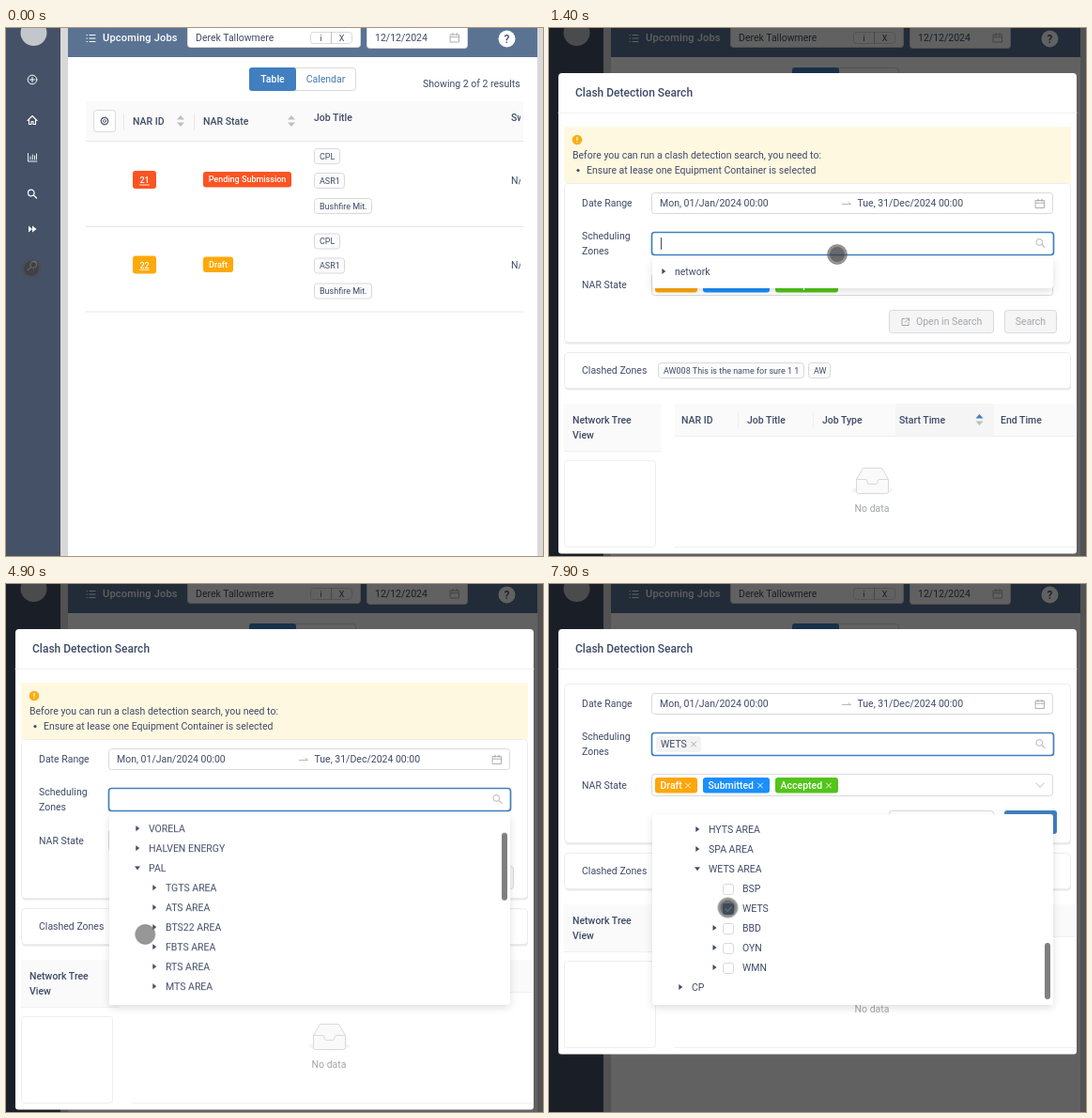
An HTML page that plays this animation: 572x562 px, repeating every 8 s.

```html
<!DOCTYPE html>
<html lang="en">
<head>
<meta charset="utf-8">
<title>Clash detection</title>
<style>
html, body { margin: 0; width: 572px; height: 562px; overflow: hidden; background: #fff; }
svg, .panel, .mask { position: absolute; left: 0; top: 0; }
text { font: 10.5px Roboto, "Liberation Sans", sans-serif; fill: #3f4b66; transform: translateY(3.8px); }
.m { font-weight: 500; }
.s { font-size: 9px; transform: translateY(3.2px); }
.title { font-size: 12px; font-weight: 500; transform: translateY(4.2px); }
.bar { font-size: 11px; font-weight: 500; letter-spacing: .2px; }
.w { fill: #fff; }
.c { text-anchor: middle; }
.dim { fill: #a3a5a9; }
.blue { fill: #4379b3; }
.line { fill: none; stroke-linecap: round; stroke-linejoin: round; }

.mask { width: 572px; height: 562px; background: rgba(0,0,0,.62); }
.panel { left: 110px; top: 245px; width: 427px; background: #fff; border-radius: 3px; overflow: hidden;
  box-shadow: 0 3px 9px rgba(0,0,0,.13); transform-origin: 50% 0; }
.view { position: absolute; top: 4px; left: 0; width: 427px; height: calc(100% - 8px); overflow: hidden; }
.thumb { position: absolute; left: 418px; top: 4px; width: 6px; border-radius: 3px; background: #7f7f7f; }

/* one loop is 8 s, so 1% is 80 ms */
.mask { animation: mask 8s linear infinite; }
.modal { transform-origin: 27px 256px; animation: zoom 8s cubic-bezier(.08,.82,.17,1) infinite; }
.body { animation: body 8s step-end infinite; }
.panel { animation: unfold 8s ease-out infinite; }
.scroll { animation: scroll 8s ease-in-out infinite; }
.thumb { animation: thumb 8s ease-in-out infinite, thumbOn 8s step-end infinite; }
.last { animation: last 8s step-end infinite; }
.cursor { animation: move 8s ease-in-out infinite; }
.press { animation: press 8s step-end infinite; }
.blink { animation: blink 1s -.9s step-end infinite; }
.ready { animation: ready 8s step-end infinite; }
.loading { animation: loading 8s step-end infinite; }
.focus { animation: focus 8s step-end infinite; }
.idle { animation: idle 8s step-end infinite; }
.kids1 { animation: kids1 8s step-end infinite; }
.kids2 { animation: kids2 8s step-end infinite; }
.kids3 { animation: kids3 8s step-end infinite; }
.picked { animation: picked 8s step-end infinite; }
.unpicked { animation: unpicked 8s step-end infinite; }
.turn1 { animation: turn1 8s infinite; }
.turn2 { animation: turn2 8s infinite; }
.turn3 { animation: turn3 8s infinite; }

@keyframes mask { 0%, 2.5% { opacity: 0; } 5.5%, 100% { opacity: 1; } }
@keyframes zoom {
  0%, 2.5% { opacity: 0; transform: scale(.2); }
  6.25%, 100% { opacity: 1; transform: none; }
}
@keyframes body {
  0% { transform: translateY(16px); }
  11.25% { transform: none; }
  96.875% { transform: translateY(-59px); }
}
@keyframes unfold {
  0%, 13.75% { opacity: 0; height: 32px; transform: scaleY(.8); }
  16%, 28.75% { opacity: 1; height: 32px; transform: none; }
  31%, 51.25% { opacity: 1; height: 139px; transform: none; }
  52.4%, 100% { opacity: 1; height: 203px; transform: none; }
}
@keyframes scroll {
  0%, 58.75% { transform: none; }
  68.75%, 81.25% { transform: translateY(-313px); }
  86.25%, 100% { transform: translateY(-418px); }
}
@keyframes thumb {
  0%, 58.75% { transform: none; height: 72px; }
  68.75%, 75% { transform: translateY(121px); height: 72px; }
  75.01%, 81.25% { transform: translateY(100px); height: 60px; }
  86.25%, 100% { transform: translateY(133px); height: 60px; }
}
@keyframes thumbOn { 0% { opacity: 0; } 58.75% { opacity: 1; } }
@keyframes last {
  0% { transform: none; }
  51.25% { transform: translateY(378px); }
  75% { transform: translateY(483px); }
}
@keyframes move {
  0%, 2.5% { transform: translate(27px, 256px); }
  8.75% { transform: translate(319px, 248px); }
  13%, 18.75% { transform: translate(307px, 241px); }
  26%, 30% { transform: translate(122px, 259px); }
  37.5% { transform: translate(145px, 340px); }
  44%, 55% { transform: translate(141px, 342px); }
  68%, 77% { transform: translate(156.5px, 408px); }
  90%, 100% { transform: translate(190.5px, 344.5px); }
}
@keyframes press {
  0%, 12.5%, 27.5%, 50%, 72.5%, 95% { opacity: 1; }
  2.5%, 18.75%, 30%, 54%, 75.6% { opacity: 0; }
}
@keyframes blink { 0% { opacity: 1; } 50% { opacity: 0; } }
@keyframes ready { 0% { opacity: 0; } 11.25% { opacity: 1; } }
@keyframes loading { 0% { opacity: 1; } 11.25% { opacity: 0; } }
@keyframes focus { 0% { opacity: 0; } 13.75% { opacity: 1; } }
@keyframes idle { 0% { opacity: 1; } 13.75% { opacity: 0; } }
@keyframes kids1 { 0% { opacity: 0; } 28.75% { opacity: 1; } }
@keyframes kids2 { 0% { opacity: 0; } 51.25% { opacity: 1; } }
@keyframes kids3 { 0% { opacity: 0; } 75% { opacity: 1; } }
@keyframes picked { 0% { opacity: 0; } 96.875% { opacity: 1; } }
@keyframes unpicked { 0% { opacity: 1; } 96.875% { opacity: 0; } }
@keyframes turn1 { 0%, 28.75% { transform: none; } 31%, 100% { transform: rotate(90deg); } }
@keyframes turn2 { 0%, 52.4% { transform: none; } 54.5%, 100% { transform: rotate(90deg); } }
@keyframes turn3 { 0%, 75% { transform: none; } 77.5%, 100% { transform: rotate(90deg); } }
</style>
</head>
<body>
<svg id="page" width="572" height="562"></svg>
<div class="mask"></div>
<svg id="dialog" width="572" height="562"></svg>
<div class="panel">
  <div class="view"><svg id="tree" width="427" height="700" viewBox="110 249 427 700"></svg></div>
  <div class="thumb"></div>
</div>
<svg width="572" height="562">
  <g class="cursor">
    <circle r="10.5" fill="rgba(75,75,75,.58)" stroke="rgba(80,80,80,.4)"/>
    <circle class="press" r="8" fill="rgba(50,50,50,.45)"/>
  </g>
</svg>
<script>
const text = (x, y, s, cls = '') => `<text x="${x}" y="${y}" class="${cls}">${s}</text>`;
const fill = (x, y, w, h, color, r = 0) =>
  `<rect x="${x}" y="${y}" width="${w}" height="${h}" rx="${r}" fill="${color}"/>`;
const box = (x, y, w, h, { bg = '#fff', edge = '#d9d9d9', r = 3, sw = 1 } = {}) =>
  `<rect x="${x + .5}" y="${y + .5}" width="${w - 1}" height="${h - 1}" rx="${r}" fill="${bg}" stroke="${edge}" stroke-width="${sw}"/>`;
const line = (d, color, sw = 1) => `<path class="line" d="${d}" stroke="${color}" stroke-width="${sw}"/>`;
const group = (cls, ...parts) => `<g class="${cls}">${parts.join('')}</g>`;
const chip = (x, y, w, s) => box(x, y, w, 17, { bg: '#fcfcfc' }) + text(x + 6, y + 8.5, s, 's');
const cross = (x, y, color) => line(`M${x - 2.5} ${y - 2.5}l5 5m0 -5l-5 5`, color, .9);
const chevron = (x, y) => line(`M${x - 4} ${y - 2}l4 4.5l4 -4.5`, '#bfbfbf');
const lens = (x, y, color) =>
  line(`M${x + 2} ${y + 1.5}l3 3M${x - 4} ${y - 1}a3.3 3.3 0 1 0 6.6 0a3.3 3.3 0 1 0 -6.6 0`, color, 1.2);
const calendar = (x, y) =>
  line(`M${x - 4.5} ${y - 3.5}h9v8h-9zM${x - 4.5} ${y - .8}h9M${x - 2} ${y - 5}v2.5M${x + 2} ${y - 5}v2.5`, '#a6a8ad', .9);
const sorter = (x, y, up = '#bfbfbf') =>
  `<path d="M${x - 4} ${y - 1.5}l4 -4.5l4 4.5z" fill="${up}"/><path d="M${x - 4} ${y + 1.5}l4 4.5l4 -4.5z" fill="#bfbfbf"/>`;

function sidebar() {
  const ink = '#fff';
  return fill(0, 0, 58, 562, '#455166') +
    '<circle cx="29.5" cy="5" r="14" fill="#c3c6cb"/>' +
    '<circle class="line" cx="28" cy="55" r="4.8" stroke="#fff"/>' + line('M25.5 55h5M28 52.5v5', ink) +
    line('M23 98.5l5 -5l5 5M24.5 98v4.5h2.5v-3h2v3h2.5v-4.5', ink, 1.1) +
    line('M23.5 133.5v8.5h9.5M26 140v-3M28.3 140v-5M30.5 140v-4M32.5 140v-6', ink, .9) +
    lens(27.5, 176.5, ink) +
    '<path d="M24 210.5l4 3.5l-4 3.5zM28 210.5l4.5 3.5l-4.5 3.5z" fill="#fff"/>' +
    `<g transform="matrix(-1 0 0 1 56 0)">${lens(27.5, 253, '#dfe2e6')}</g>`;
}

function topBar() {
  return fill(58, 0, 8, 562, '#d8d8d8') + fill(566, 0, 6, 562, '#d8d8d8') + fill(66, 0, 500, 31, '#5b7393') +
    line('M86 7.5h.5M89 7.5h6M86 11h.5M89 11h6M86 14.5h.5M89 14.5h6', '#fff') +
    text(103, 10.5, 'Upcoming Jobs', 'bar w') +
    box(193, -5, 185, 26) + text(202, 10.5, 'Derek Tallowmere') +
    box(324, 4, 45, 13) + line('M346.5 4.5v12', '#bfbfbf') +
    text(335.5, 10.5, 'i', 's c') + text(357.5, 10.5, 'X', 's c') +
    box(384, -5, 108, 27) + text(393, 10.5, '12/12/2024') + calendar(478, 10.5) +
    '<circle cx="533.5" cy="11.5" r="9" fill="#fff"/>' + text(533.5, 11.5, '?', 'title c');
}

function jobRow(y, id, state, width, color) {
  return fill(135, y + 31, 25, 19, color, 3) + text(147.5, y + 41, id, 's w m c') + line(`M142.5 ${y + 46}h10`, '#fff', .8) +
    fill(210, y + 32, width, 16.5, color, 3) + text(210 + width / 2, y + 40, state, 's w m c') +
    chip(328, y + 7, 28, 'CPL') + chip(328, y + 33, 33, 'ASR1') + chip(328, y + 60, 62, 'Bushfire Mit.') +
    `<svg x="538" y="${y}" width="10" height="80">${text(0, 41, 'N/A')}</svg>` +
    line(`M85 ${y + 90.5}h466`, '#e6e6e6');
}

function jobs() {
  return box(300, 42, 73, 25) + fill(259, 42, 50, 25, '#417fc0', 3) +
    text(284, 54.5, 'Table', 'w m c') + text(340.5, 54.5, 'Calendar', 'blue c') +
    text(444, 59, 'Showing 2 of 2 results') +
    fill(85, 78, 466, 42, '#fafafa') + line('M85 120.5h466', '#e6e6e6') + line('M125.5 91v17M200.5 91v17', '#e8e8e8') +
    box(93, 87, 24, 24) +
    '<circle class="line" cx="105" cy="99" r="3.7" stroke="#555d6c" stroke-width="1.4" stroke-dasharray="1.9 1"/>' +
    '<circle class="line" cx="105" cy="99" r="1.5" stroke="#555d6c" stroke-width=".9"/>' +
    text(135, 99, 'NAR ID', 'm') + sorter(186, 99) + text(210, 99, 'NAR State', 'm') + sorter(304, 99) +
    text(328, 95, 'Job Title', 'm') +
    `<svg x="538" y="80" width="10" height="30">${text(0, 15, 'Sw', 'm')}</svg>` +
    jobRow(121, '21', 'Pending Submission', 94, '#f95423') + jobRow(211.5, '22', 'Draft', 32, '#ffa908');
}

function alertBox() {
  const bullet = (y, s) => `<circle cx="31" cy="${y + .5}" r="1.6" fill="#3f4b66"/>` + text(40, y, s);
  return group('unpicked',
    fill(16, 105, 540, 76, '#fff8e1'),
    '<circle cx="30" cy="119" r="5.3" fill="#faad14"/>', line('M30 116.3v3M30 121.5v.1', '#fff', 1.2),
    text(25, 135, 'Before you can run a clash detection search, you need to:'),
    bullet(151, 'Ensure at lease one Equipment Container is selected'),
    group('loading', bullet(167, 'Select at least one state to include in your clash detection search')));
}

function card(y, h) {
  return fill(17, y + 1.5, 539, h, '#e9e9e9', 4) + box(16, y, 540, h, { edge: '#ececec', r: 4 });
}

function stateTag(x, w, s, color) {
  return fill(x, 265, w, 16.5, color, 3) + text(x + 5.5, 273, s, 'w m') + cross(x + w - 10, 273.5, '#fff');
}

function openIcon(color) {
  return line('M379 309.5h-3v7h7v-3M380.5 309h3v3M383.2 309.3l-4 4', color);
}

function form() {
  const off = { bg: '#f5f5f5' };
  return card(165, 170) +
    text(35, 186, 'Date Range') + box(109, 175, 428, 23) + text(118, 186, 'Mon, 01/Jan/2024 00:00') +
    line('M312.5 187.5h9l-2.5 -2', '#b5b7bb') + text(328.5, 186, 'Tue, 31/Dec/2024 00:00') + calendar(523, 187) +
    text(35, 221, 'Scheduling') + text(35, 237, 'Zones') + box(109, 217, 428, 24) +
    group('idle', chevron(523, 229)) +
    group('focus', box(109, 217, 429, 25, { edge: '#417fc0', sw: 1.7 }), lens(523, 229, '#c4c4c4'),
      group('unpicked', group('blink', line('M119.5 223.5v12', '#3f4b66')))) +
    group('picked', fill(114, 221, 48, 17, '#f3f3f3', 3), text(119, 229, 'WETS'), cross(154, 229.5, '#a0a0a0')) +
    text(35, 273, 'NAR State') +
    group('loading', box(109, 261, 428, 24, off), line('M521 270.5v4', '#c9c9c9')) +
    group('ready', box(109, 261, 428, 24), stateTag(113, 45, 'Draft', '#ffa60a'),
      stateTag(164, 71, 'Submitted', '#1b8ffb'), stateTag(241, 67, 'Accepted', '#52c41a'), chevron(523, 273)) +
    box(362, 300, 112, 25, off) + openIcon('#a3a5a9') + text(391, 312.5, 'Open in Search', 'dim') +
    box(485, 300, 56, 25, off) + text(513, 312.5, 'Search', 'dim c') +
    group('picked', box(362, 300, 112, 25), openIcon('#3f4b66'), text(391, 312.5, 'Open in Search'),
      fill(485, 300, 56, 25, '#417fc0', 3), text(513, 312.5, 'Search', 'w c'));
}

function results() {
  const heads = [[141, 'NAR ID'], [211, 'Job Title'], [291, 'Job Type'], [373, 'Start Time'], [481, 'End Time']];
  return card(345, 39) + text(35, 364, 'Clashed Zones') +
    chip(116, 356, 156, 'AW008 This is the name for sure 1 1') + chip(276, 356, 24, 'AW') +
    fill(16, 400, 104, 51, '#fafafa') + line('M16 450.5h104', '#f0f0f0') +
    text(25, 417, 'Network Tree', 'm') + text(25, 433, 'View', 'm') +
    box(16, 460, 98, 93, { edge: '#eeeeee' }) +
    fill(134, 400, 426, 35, '#fafafa') + fill(369, 400, 105, 35, '#f5f5f5') +
    line('M134 434.5h426M134 552.5h426M201.5 409v16M281.5 409v16', '#f0f0f0') +
    heads.map(([x, s]) => text(x, 417, s, 'm')).join('') + sorter(458.5, 417, '#417fc0') +
    '<ellipse cx="344.5" cy="492" rx="22" ry="4.5" fill="#f5f5f5"/>' +
    `<g fill="#fafafa" stroke="#d9d9d9"><path d="M327.5 480.5l7 -12h20l7 12v13q0 2 -2 2h-30q-2 0 -2 -2z"/>
     <path d="M327.5 480.5h9.500q2 0 2 2.500q0 2.500 2 2.500h7q2 0 2 -2.500q0 -2.500 2 -2.500h9.500"/></g>` +
    text(344, 511, 'No data', 'dim c');
}

function dialog() {
  return group('modal',
    fill(10, 48, 552, 250, '#fff', 4), line('M10 90.5h552', '#f0f0f0'),
    text(28, 69, 'Clash Detection Search', 'title'),
    alertBox(),
    group('body', fill(10, 165, 552, 394.5, '#fff', 3), form(), results()));
}

function node(row, depth, name, turn = '') {
  const x = 122 + depth * 18, y = 259 + row * 21;
  return `<g transform="translate(${x} ${y})"><path class="${turn}" d="M-1.7 -3L2.300 0L-1.700 3z" fill="#3f4b66"/></g>` +
    text(x + 12, y, name);
}

function leaf(row, name, caret) {
  const y = 259 + row * 21;
  return (caret ? `<path d="M174.5 ${y - 3}l4 3l-4 3z" fill="#3f4b66"/>` : '') +
    box(185, y - 5, 12, 12, { r: 2.5 }) + text(206, y, name);
}

function tree() {
  const areas = 'TGTS ATS BTS22 FBTS RTS MTS TTS BLTS HOTS RCTS KTS GTS BETS KGTS SHTS HYTS SPA WETS'.split(' ');
  const zones = ['BSP', 'WETS', 'BBD', 'OYN', 'WMN'];
  const tick = 259 + 24 * 21;
  return group('scroll',
    node(0, 0, 'network', 'turn1'),
    group('kids1',
      ['Sub-Trans Lines', 'VORELA', 'HALVEN ENERGY'].map((s, i) => node(i + 1, 1, s)).join(''),
      node(4, 1, 'PAL', 'turn2'),
      group('last', node(5, 1, 'CP'))),
    group('kids2', areas.map((s, i) => node(i + 5, 2, s + ' AREA', s === 'WETS' ? 'turn3' : '')).join('')),
    group('kids3', zones.map((s, i) => leaf(i + 23, s, i > 1)).join('')),
    group('picked', fill(185, tick - 5, 12, 12, '#417fc0', 2.5), line(`M188 ${tick + 1}l2.300 2.300l4 -4.500`, '#fff', 1.3)));
}

const put = (id, html) => document.getElementById(id).innerHTML = html;
put('page', fill(0, 0, 572, 562, '#fff') + sidebar() + topBar() + jobs());
put('dialog', dialog());
put('tree', tree());
</script>
</body>
</html>
```
